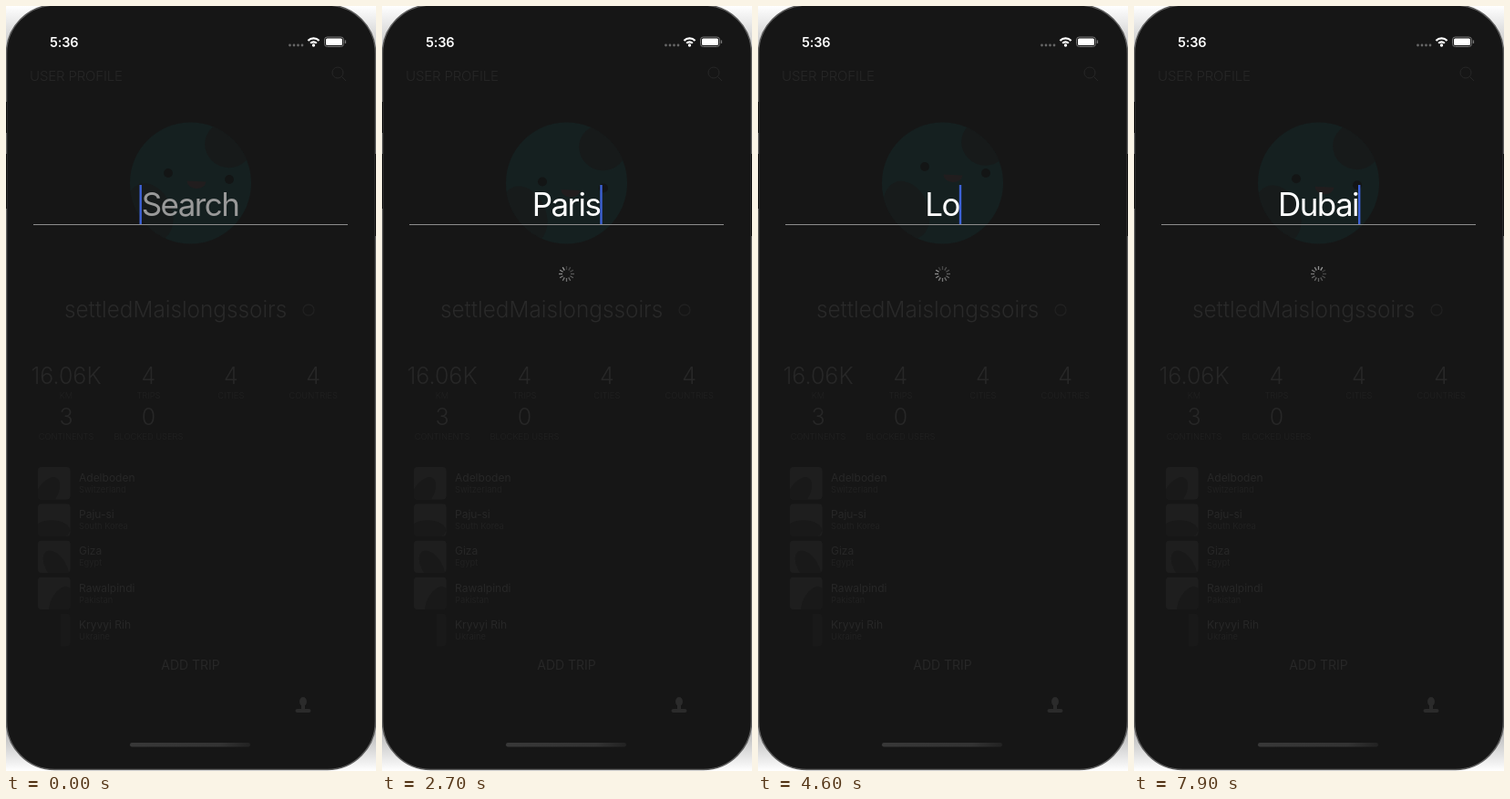
Animation of 406x838 px, one loop 8000 ms. Source, as an HTML page with a canvas:

```html
<!DOCTYPE html>
<html lang="en">
<head>
<meta charset="utf-8">
<title>City search</title>
<style>
  html, body { margin: 0; width: 100%; height: 100%; overflow: hidden; background: #161616; }
  canvas { display: block; }
</style>
</head>
<body>
<canvas id="stage" width="406" height="838"></canvas>
<script>
const ctx = document.getElementById('stage').getContext('2d');
const LOOP = 8000, FAINT = '#272727', DIM = '#212121', BG = '#161616';

// Each search: first key, time per key, results shown, field cleared.
const searches = [
  { word: 'New York', start: 200, step: 125, list: 1200, clear: 1700, rows: [
    ['New York', 'NY, USA'], ['East New York', 'NY, USA'], ['West New York', 'NJ, USA'], ['New York Mills', 'MN, USA']] },
  { word: 'Paris', start: 2150, step: 120, list: 2750, clear: 3200, rows: [
    ['Paris', 'France'], ['Paris', 'TX, USA'], ['Paris', 'ON, Canada'], ['Paris', 'TN, USA'], ['Paris', 'KY, USA']] },
  { word: 'Tokyo', start: 3500, step: 90, list: 3950, clear: 4350, rows: [
    ['Tokyo', 'Japan'], ['Kyoto', 'Japan'], ['Toyota', 'Japan'], ['Tokorozawa', 'Japan'], ['Tokushima', 'Japan']] },
  { word: 'London', start: 4500, step: 90, list: 5200, clear: 5950, rows: [
    ['London', 'UK'], ['London', 'ON, Canada'], ['London', 'KY, USA'], ['Londonderry', 'UK'], ['Londonderry', 'NH, USA']] },
  { word: 'Beijing', start: 6150, step: 105, list: 7000, clear: 7350, rows: [['Beijing', 'China']] },
  { word: 'Dubai', start: 7500, step: 90, list: LOOP, clear: LOOP, rows: [] }
];

// Time and offset of the globe's face.
const facePath = [[0, 0, 0], [1900, -2, 10], [3400, -2, 9], [4600, 5, -7],
  [5000, 0, 0], [5800, 0, 0], [6900, 0, 8], [8000, 0, 6]];

const trips = [['Adelboden', 'Switzerland'], ['Paju-si', 'South Korea'], ['Giza', 'Egypt'],
  ['Rawalpindi', 'Pakistan'], ['Kryvyi Rih', 'Ukraine']];

function text(str, x, y, size, color, { weight = 400, align = 'left', spacing = 0 } = {}) {
  ctx.font = `${weight} ${size}px Inter, sans-serif`;
  ctx.letterSpacing = spacing * size + 'px';
  ctx.textAlign = align;
  ctx.fillStyle = color;
  ctx.fillText(str, x, y);
}

function rect(x, y, w, h, color) {
  ctx.fillStyle = color;
  ctx.fillRect(x, y, w, h);
}

function round(x, y, w, h, r) {
  ctx.beginPath();
  ctx.roundRect(x, y, w, h, r);
}

function ellipse(x, y, rx, ry, color, tilt = 0) {
  ctx.beginPath();
  ctx.ellipse(x, y, rx, ry, tilt, 0, Math.PI * 2);
  ctx.fillStyle = color;
  ctx.fill();
}

function stroke(color, width = 1) {
  ctx.strokeStyle = color;
  ctx.lineWidth = width;
  ctx.stroke();
}

function line(x1, y1, x2, y2, color, width) {
  ctx.beginPath();
  ctx.moveTo(x1, y1);
  ctx.lineTo(x2, y2);
  stroke(color, width);
}

function phone() {
  const back = ctx.createLinearGradient(0, 0, 0, 838);
  [[0, '#fff'], [.07, '#b8b8b8'], [.93, '#a0a0a0'], [1, '#fff']].forEach(s => back.addColorStop(...s));
  rect(0, 0, 406, 838, back);
  round(.5, -1, 405, 837.5, 53);
  ctx.fillStyle = BG;
  ctx.fill();
  stroke('#5c5c5c', 1.6);
  for (const [x, y, h] of [[0, 105, 34], [0, 162, 60], [405, 162, 90]]) rect(x, y, 1, h, '#111');
}

function statusBar() {
  text('5:36', 48, 44.5, 14.5, '#fff', { weight: 600, spacing: -.01 });
  for (let i = 0; i < 4; i++) ellipse(311.5 + i * 4.5, 43, 1.4, 1.4, '#666');
  for (const r of [4.7, 8.6]) {
    ctx.beginPath();
    ctx.arc(337.5, 44, r, -Math.PI * .75, -Math.PI * .25);
    stroke('#fff', 2.2);
  }
  ellipse(337.5, 43, 1.7, 1.7, '#fff');
  round(349.5, 34, 21, 10.5, 3);
  stroke('#777');
  round(351, 35.5, 18, 7.5, 1.5);
  ctx.fillStyle = '#fff';
  ctx.fill();
  rect(371.8, 37.5, 1.3, 3.5, '#777');
}

function globe(t) {
  const i = facePath.findIndex(p => p[0] > t) - 1;
  const [a, b] = [facePath[i], facePath[i + 1]];
  const k = (t - a[0]) / (b[0] - a[0]);
  const dx = a[1] + (b[1] - a[1]) * k, dy = a[2] + (b[2] - a[2]) * k;
  ctx.save();
  ctx.beginPath();
  ctx.arc(202.5, 194, 66.5, 0, Math.PI * 2);
  ctx.clip();
  rect(130, 120, 145, 150, '#152020');
  ellipse(244 + dx, 152 + dy / 3, 26, 25, '#171a1a', .4);
  ellipse(158 + dx, 226 + dy / 3, 24, 33, '#171b1b', -.4);
  ellipse(178 + dx, 183 + dy, 5, 5, '#131515');
  ellipse(245 + dx, 190 + dy, 5, 5, '#131515');
  ctx.beginPath();
  ctx.ellipse(209 + dx, 192 + dy, 10.5, 8, .05, 0, Math.PI);
  ctx.fillStyle = '#211d1e';
  ctx.fill();
  ctx.restore();
}

function profile(t) {
  const center = { align: 'center' }, light = { align: 'center', weight: 300 };
  text('USER PROFILE', 26, 82, 15, FAINT, { weight: 300, spacing: -.01 });
  ctx.beginPath();
  ctx.arc(364, 73, 6, 0, Math.PI * 2);
  stroke(FAINT);
  line(368.5, 77.5, 373, 82, FAINT, 1);
  globe(t);
  text('settledMaislongssoirs', 64, 340.5, 24.3, '#292929', { weight: 300 });
  ctx.beginPath();
  ctx.arc(332, 333, 6, 0, Math.PI * 2);
  stroke(DIM, 1.3);

  const stats = [['16.06K', 'KM'], ['4', 'TRIPS'], ['4', 'CITIES'], ['4', 'COUNTRIES'],
    ['3', 'CONTINENTS'], ['0', 'BLOCKED USERS']];
  stats.forEach(([value, label], i) => {
    const x = 66 + i % 4 * 90.4, y = 414 + (i >> 2) * 45;
    text(value, x, y, 25, FAINT, light);
    text(label, x, y + 15.5, 9.3, DIM, light);
  });

  trips.forEach(([city, country], i) => {
    const y = 505 + i * 40.2;
    ctx.save();
    round(35, y, 35.5, 35.5, 4);
    ctx.clip();
    if (i < 4) {
      rect(35, y, 36, 36, '#1e1e1e');
      ellipse(45 + i * 5, y + 29, 20, 11, '#191919', i - 1);
    } else {
      rect(60, y, 11, 36, '#191919');
    }
    ctx.restore();
    text(city, 80, y + 16, 12, FAINT);
    text(country, 80, y + 28, 9.3, DIM);
  });

  text('ADD TRIP', 202.5, 727, 14, FAINT, center);
  ellipse(326, 762, 4, 5, '#2b2b2b');
  rect(324, 765, 4, 5, '#2b2b2b');
  round(317.5, 770, 17, 4, 2);
  ctx.fill();
  const bar = ctx.createLinearGradient(136, 0, 268, 0);
  bar.addColorStop(0, '#383838');
  bar.addColorStop(.75, '#333');
  bar.addColorStop(1, '#222');
  round(136, 807, 132, 4.5, 2.2);
  ctx.fillStyle = bar;
  ctx.fill();
}

function photo(x, y) {
  const sky = ctx.createLinearGradient(0, y, 0, y + 36);
  sky.addColorStop(0, '#ddd');
  sky.addColorStop(1, '#999');
  ctx.save();
  round(x, y, 36, 36, 4);
  ctx.clip();
  rect(x, y, 36, 36, sky);
  rect(x + 11, y + 11, 5, 17, '#444');
  ctx.beginPath();
  ctx.moveTo(x + 11, y + 11);
  ctx.lineTo(x + 13.5, y + 5);
  ctx.lineTo(x + 16, y + 11);
  ctx.fill();
  rect(x + 16, y + 22, 20, 6, '#555');
  rect(x, y + 25, 13, 4, '#666');
  ellipse(x + 30, y + 33, 18, 5, '#5e5e5e', -.2);
  ctx.restore();
}

function results(rows) {
  text('CITIES', 30, 247, 6.6, '#888', { spacing: .08 });
  rows.forEach(([city, region], i) => {
    const y = 251 + i * 40.3;
    if (!i) photo(30.5, y);
    round(30.5, y + .5, 35.5, 35.5, 4);
    stroke('#555');
    text(city, 75.5, y + 17.5, 12, '#eee', { weight: 500 });
    text(region, 75.5, y + 28, 9.5, '#ddd');
  });
}

function spinner(t) {
  const head = Math.floor(t / 1000 * 12);
  for (let i = 0; i < 12; i++) {
    const a = i * Math.PI / 6, c = Math.cos(a), s = Math.sin(a);
    const shade = 150 - ((head - i) % 12 + 12) % 12 * 8;
    line(202.5 + c * 4.5, 293.5 + s * 4.5, 202.5 + c * 8.5, 293.5 + s * 8.5, `rgb(${shade},${shade},${shade})`, 1.3);
  }
}

function searchField(t) {
  const s = searches.find(s => t < s.clear);
  const count = t < s.start ? 0 : Math.floor((t - s.start) / s.step) + 1;
  const typed = s.word.slice(0, count), listed = t >= s.list;
  text(typed || 'Search', 202, 230, 35, typed ? '#fff' : '#999', { align: 'center', spacing: -.045 });
  const half = ctx.measureText(typed || 'Search').width / 2;
  line(30, 239.5, 375, 239.5, '#8c8c8c', 1);
  if (!listed && t > s.start - 210) {
    rect(typed ? 202 + half : 146.5, 196, 2.4, 43, '#3d62d6');
  }
  if (listed) results(s.rows);
  else if (typed) spinner(t);
}

function draw(now) {
  const t = now % LOOP;
  phone();
  profile(t);
  statusBar();
  searchField(t);
  requestAnimationFrame(draw);
}
requestAnimationFrame(draw);
</script>
</body>
</html>
```
